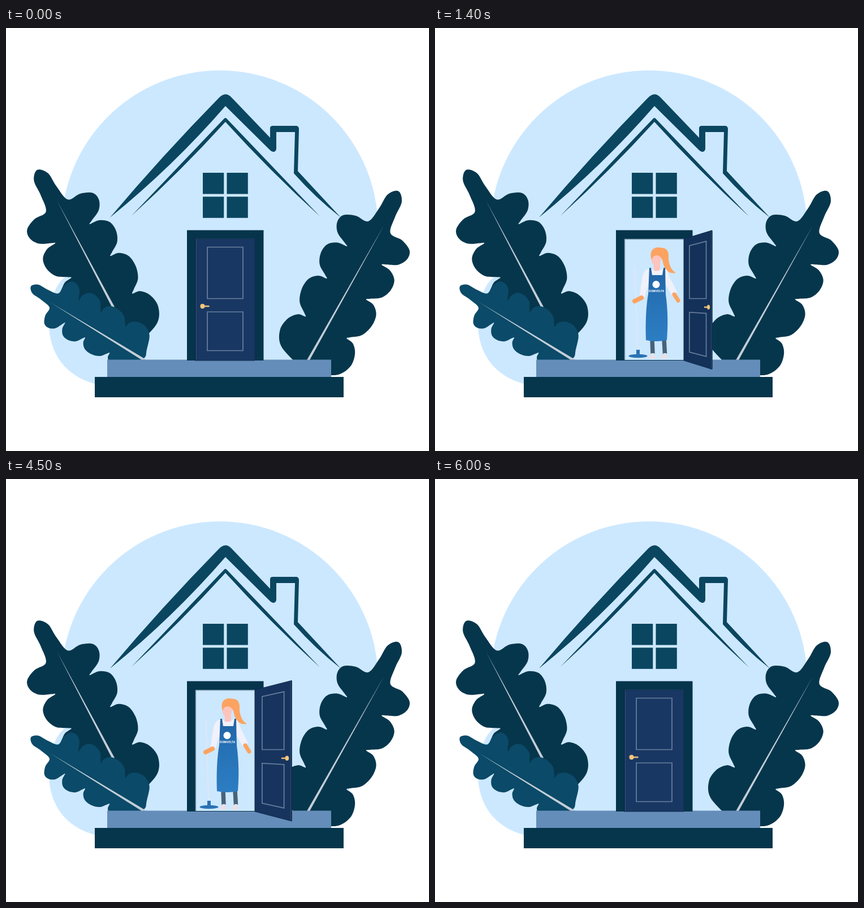
An HTML page with a canvas that plays this animation: 748 px wide and 748 px high, repeating every 8010 ms.

```html
<!DOCTYPE html>
<html lang="en">
<head>
<meta charset="utf-8">
<title>Opening door</title>
<style>
  html, body { margin: 0; width: 100%; height: 100%; overflow: hidden; background: #fff; }
  canvas { display: block; width: 100%; height: 100%; }
</style>
</head>
<body>
<canvas id="stage" width="748" height="748"></canvas>
<script>
const ctx = document.getElementById('stage').getContext('2d');
const LOOP = 8010;
const DARK = '#06364c', TEAL = '#0b4a68', ROOF = '#0b4660', SKY = '#cce8ff';

const lerp = (a, b, f) => a + (b - a) * f;

function fill(path, color) {
  ctx.fillStyle = color;
  ctx.fill(new Path2D(path));
}

function rect(x, y, right, bottom, color) {
  ctx.fillStyle = color;
  ctx.fillRect(x, y, right - x, bottom - y);
}

function ellipse(x, y, rx, ry, color) {
  ctx.fillStyle = color;
  ctx.beginPath();
  ctx.ellipse(x, y, rx, ry, 0, 0, Math.PI * 2);
  ctx.fill();
}

function line(x1, y1, x2, y2, width, color) {
  ctx.strokeStyle = color;
  ctx.lineWidth = width;
  ctx.beginPath();
  ctx.moveTo(x1, y1);
  ctx.lineTo(x2, y2);
  ctx.stroke();
}

// Closed Catmull-Rom curve
function smoothShape(points, color) {
  const at = i => points[(i + points.length) % points.length];
  ctx.beginPath();
  ctx.moveTo(...points[0]);
  points.forEach((b, i) => {
    const a = at(i - 1), c = at(i + 1), d = at(i + 2);
    ctx.bezierCurveTo(
      b[0] + (c[0] - a[0]) / 6, b[1] + (c[1] - a[1]) / 6,
      c[0] - (d[0] - b[0]) / 6, c[1] - (d[1] - b[1]) / 6, c[0], c[1]);
  });
  ctx.fillStyle = color;
  ctx.fill();
}

// One oak leaf along the x axis: a slim tip, then four lobes per side that grow longer
function leafOutline() {
  const LOBES = 4, REACH = 70;
  const lobe = [[0, 0], [.03, .5], [.2, .92], [.48, 1], [.76, .75], [.93, .2]];
  const notchAt = k => 8 + 52 * k + 5 * k * k;
  const notchWidth = k => k < LOBES ? 42 - 20 * .35 ** k : 0;
  const side = [[-50, 14], [-22, 16]];
  for (let k = 0; k < LOBES; k++) {
    for (const [along, out] of lobe) {
      const inner = lerp(notchWidth(k), notchWidth(k + 1), along);
      side.push([lerp(notchAt(k), notchAt(k + 1), along), lerp(inner, REACH, out)]);
    }
  }
  const mirrored = side.map(([x, y]) => [x, -y]).reverse();
  return [[-64, 0], ...side, [notchAt(LOBES), 0], ...mirrored];
}
const LEAF = leafOutline();

function leaf(x, y, towardX, towardY, size, color) {
  ctx.save();
  ctx.translate(x, y);
  ctx.rotate(Math.atan2(towardY - y, towardX - x));
  ctx.scale(size, size);
  smoothShape(LEAF, color);
  ctx.restore();
}

function vein(x1, y1, x2, y2) {
  const length = Math.hypot(x2 - x1, y2 - y1);
  const nx = (y1 - y2) / length * 2.2, ny = (x2 - x1) / length * 2.2;
  fill(`M${x1} ${y1}L${x2 + nx} ${y2 + ny}L${x2 - nx} ${y2 - ny}Z`, '#c3ced8');
}

function drawBackdrop() {
  ctx.fillStyle = SKY;
  ctx.beginPath();
  ctx.arc(378, 355, 280, Math.PI - .3, 0);
  ctx.bezierCurveTo(658, 460, 610, 540, 575, 617);
  ctx.lineTo(160, 630);
  ctx.bezierCurveTo(105, 616, 76, 575, 76, 522);
  ctx.bezierCurveTo(76, 482, 90, 444, 110.5, 437.7);
  ctx.fill();
}

function drawHouse() {
  fill('M184 335Q276 226 376 124Q388 111 399 123L467 194V177Q467 173 472 173H514Q518 174 518 179L516 253L592 335Q547 300 509 257L511 184H478V214Q476 222 468 217L388 138Q295 245 184 335Z', ROOF);
  fill('M222 332L385 161Q388 157 391 161L555 333Q467 253 388 166Q309 253 222 332Z', ROOF);
  for (const x of [348, 390.5]) {
    for (const y of [256, 298.3]) rect(x, y, x + 37.3, y + 37.5, ROOF);
  }

  leaf(86, 307, 190, 494, 1, DARK);
  vein(90, 305, 190, 494);
  leaf(664, 345, 535, 588, 1, DARK);
  vein(669, 348, 534, 588);
  leaf(80, 479, 246, 581, .66, TEAL);
  vein(78, 485, 246, 588);

  rect(179, 586.5, 575, 617, '#658db9');
  rect(157, 617, 597, 653, DARK);
  rect(320, 357.5, 455.5, 588, '#05344b');
  rect(335, 373, 440, 587, SKY);
  line(335.5, 373, 335.5, 587, 1.5, '#7f9bad');
  line(335, 373.5, 440, 373.5, 1.5, '#7f9bad');
}

function drawCleaner() {
  const skin = '#fdc3bd', hair = '#fca361', shirt = '#f0f1fb', blue = '#2a72b5';

  line(353, 422, 358.5, 570, 2, '#dfe7f3');
  ellipse(359, 580, 16.5, 3.2, blue);
  rect(356, 569, 362, 579, blue);

  for (const [x, lean] of [[384, 1], [405, 1.5]]) {
    line(x, 550, x + lean, 576, 7.5, '#48627a');
    line(x + lean, 575, x + lean, 580, 5, '#ecdfe4');
    ellipse(x, 582, 6.5, 2.8, '#ecdfe4');
  }

  fill('M398 389C411 387 414 397 413 408C414 421 419 429 426 433C412 436 402 424 402 404Z', hair);
  rect(387, 412, 398, 431, skin);
  fill('M382 424Q391 436 404 423Q412 427 415 441L428 467L419 473L407 453V480H376V455L371 476L362 474C365 455 365 433 374 427Z', shirt);
  ctx.lineCap = 'round';
  line(365, 477, 353, 483, 8, hair);
  line(423, 471, 430, 482, 7, hair);
  ctx.lineCap = 'butt';
  ellipse(391, 408, 8.5, 13, skin);
  fill('M383 410C379 396 384 388 395 388C406 388 409 397 402 411C400 405 397 403 393 402C388 402 385 404 383 410Z', hair);

  const cloth = ctx.createLinearGradient(0, 425, 0, 553);
  cloth.addColorStop(0, '#2162a4');
  cloth.addColorStop(.4, '#2671b5');
  cloth.addColorStop(1, '#2c7dc3');
  fill('M379 424H382L384 437H402L404 424H407L408 471C412 500 412 527 410 552Q391 556 373 552C372 520 373 495 377 470Z', cloth);
  ellipse(391, 453.5, 6.5, 6.5, '#fff');
  ctx.fillStyle = '#fff';
  ctx.font = 'bold 4.7px Inter, sans-serif';
  ctx.textAlign = 'center';
  ctx.fillText('DOMIVELTA', 391.5, 467);
}

// open: 0 = shut, 1 = swung fully outwards
function drawDoor(open) {
  const hinge = 440, width = 106;
  const side = (width - 185.5 * open) / width;

  // Maps a position on the shut door onto the swung one
  const place = (x, y) => {
    const u = (hinge - x) / width, v = (y - 373) / 215;
    return [hinge - u * width * side, y + u * open * lerp(-18, 18.5, v)];
  };
  const outline = (x, y, right, low) => {
    ctx.beginPath();
    for (const p of [[x, y], [right, y], [right, low], [x, low]]) ctx.lineTo(...place(...p));
    ctx.closePath();
  };

  const shade = Math.max(0, .75 - Math.abs(side)) / .75;
  outline(334, 373, 440, 588);
  ctx.fillStyle = `rgb(${25 - 14 * shade},${55 - 15 * shade},${99 - 27 * shade})`;
  ctx.fill();
  ctx.strokeStyle = '#102e50';
  ctx.lineWidth = 1;
  ctx.stroke();
  line(...place(335, 374), ...place(335, 587), 2, '#0d2c4c');
  line(...place(336.5, 374), ...place(336.5, 587), .7, '#45627f');

  for (const [y, low] of [[387.5, 478.5], [502, 570.5]]) {
    outline(356, y, 419, low);
    ctx.strokeStyle = 'rgba(158,177,198,.6)';
    ctx.lineWidth = 1.7;
    ctx.stroke();
  }

  const [knobX, knobY] = place(347.5, 492);
  const scale = Math.min(1, Math.abs(side) * 1.35);
  ctx.globalAlpha = side > 0 ? Math.min(1, Math.max(.15, (side - .4) / .3)) : 1;
  line(knobX, knobY, knobX + 12 * scale * Math.sign(side), knobY, 2.6, '#e9bd79');
  ellipse(knobX, knobY, 4 * Math.max(scale, .3), 4.2, '#f5c67c');
  ctx.globalAlpha = 1;
}

const ease = p => p < .5 ? 4 * p ** 3 : 1 - 4 * (1 - p) ** 3;

// Two pictures per tenth of a second, 39 per swing
function swingStep(elapsed) {
  const step = 1 + 2 * Math.floor(elapsed / 100) + (elapsed % 100 >= 30 ? 1 : 0);
  return Math.min(39, step);
}

function openness(t) {
  if (t < 100 || t >= 6000) return 0;
  if (t < 2000) return ease(swingStep(t - 100) / 41);
  if (t < 4100) return 1;
  return 1 - ease((swingStep(t - 4100) + 2) / 41);
}

const start = performance.now();
function frame() {
  const t = (performance.now() - start) % LOOP;
  ctx.fillStyle = '#fff';
  ctx.fillRect(0, 0, 748, 748);
  drawBackdrop();
  drawHouse();
  drawCleaner();
  drawDoor(openness(t));
  requestAnimationFrame(frame);
}
frame();
</script>
</body>
</html>
```
